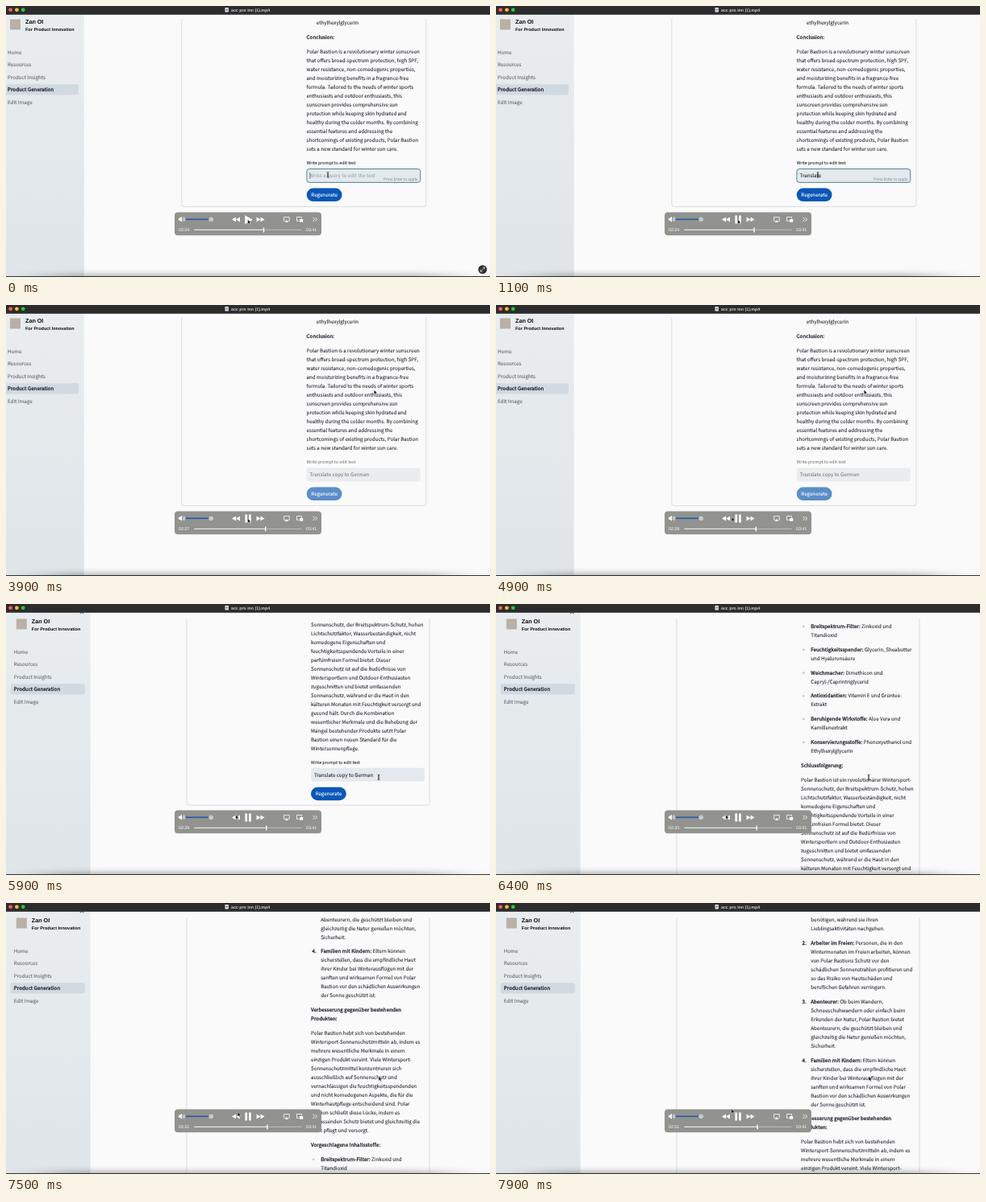
These frames come from a looping animation (600 by 337 pixels, 8 s). An HTML page:

```html
<!DOCTYPE html>
<html lang="en">
<head>
<meta charset="utf-8">
<title>Product generation demo</title>
<style>
  html, body { margin: 0; width: 100%; height: 100%; overflow: hidden; background: #fafafa; }
  svg { display: block; width: 100vw; height: 100vh; }
  text {
    font: 6.18px "Noto Sans CJK JP", "Noto Sans CJK SC", "Noto Sans", sans-serif;
    fill: #2d2f38; stroke: #2d2f38; stroke-width: .1px;
    text-rendering: geometricPrecision; white-space: pre;
  }
  /* a semibold look: slightly thickened regular letters */
  .semi { stroke-width: .34px; letter-spacing: .06px; }
  .ui { font-family: "Liberation Sans", Arial, sans-serif; font-weight: 700; stroke: none; }
  .light { stroke: none; }
  .nav { fill: #646970; stroke: #646970; }
  .nav.semi { fill: #252a33; stroke: #252a33; }
  .stale { fill: #666a72; stroke: none; }
  .empty { fill: #929aa0; stroke: none; }
</style>
</head>
<body>
<svg id="stage" viewBox="0 0 600 337" preserveAspectRatio="none"></svg>
<script>
const LOOP = 8000, STEP = 100, LINE = 11, GAP = 17.83;
const stage = document.getElementById('stage');
const $ = id => document.getElementById(id);

const ENGLISH = [
  { list: 1, lines: ['ethylhexylglycerin'] },
  { lines: ['Conclusion:|'] },
  { lines: [
    'Polar Bastion is a revolutionary winter sunscreen',
    'that offers broad-spectrum protection, high SPF,',
    'water resistance, non-comedogenic properties,',
    'and moisturizing benefits in a fragrance-free',
    'formula. Tailored to the needs of winter sports',
    'enthusiasts and outdoor enthusiasts, this',
    'sunscreen provides comprehensive sun',
    'protection while keeping skin hydrated and',
    'healthy during the colder months. By combining',
    'essential features and addressing the',
    'shortcomings of existing products, Polar Bastion',
    'sets a new standard for winter sun care.'] }
];

const bullet = (...lines) => ({ list: 1, mark: '•', lines });
const GERMAN = [
  { list: 1, lines: ['benötigen, während sie ihren', 'Lieblingsaktivitäten nachgehen.'] },
  { list: 1, mark: '2.', lines: [
    'Arbeiter im Freien:| Personen, die in den',
    'Wintermonaten im Freien arbeiten, können',
    'von Polar Bastions Schutz vor den',
    'schädlichen Sonnenstrahlen profitieren und',
    'so das Risiko von Hautschäden und',
    'beruflichen Gefahren verringern.'] },
  { list: 1, mark: '3.', lines: [
    'Abenteurer:| Ob beim Wandern,',
    'Schneeschuhwandern oder einfach beim',
    'Erkunden der Natur, Polar Bastion bietet',
    'Abenteurern, die geschützt bleiben und',
    'gleichzeitig die Natur genießen möchten,',
    'Sicherheit.'] },
  { list: 1, mark: '4.', lines: [
    'Familien mit Kindern:| Eltern können',
    'sicherstellen, dass die empfindliche Haut',
    'ihrer Kinder bei Winterausflügen mit der',
    'sanften und wirksamen Formel von Polar',
    'Bastion vor den schädlichen Auswirkungen',
    'der Sonne geschützt ist.'] },
  { lines: ['Verbesserung gegenüber bestehenden|', 'Produkten:|'] },
  { lines: [
    'Polar Bastion hebt sich von bestehenden',
    'Wintersport-Sonnenschutzmitteln ab, indem es',
    'mehrere wesentliche Merkmale in einem',
    'einzigen Produkt vereint. Viele Wintersport-',
    'Sonnenschutzmittel konzentrieren sich',
    'ausschließlich auf Sonnenschutz und',
    'vernachlässigen die feuchtigkeitsspendenden',
    'und nicht komedogenen Aspekte, die für die',
    'Winterhautpflege entscheidend sind. Polar',
    'Bastion schließt diese Lücke, indem es',
    'umfassenden Schutz bietet und gleichzeitig die',
    'Haut pflegt und versorgt.'] },
  { lines: ['Vorgeschlagene Inhaltsstoffe:|'] },
  bullet('Breitspektrum-Filter:| Zinkoxid und', 'Titandioxid'),
  bullet('Feuchtigkeitsspender:| Glycerin, Sheabutter', 'und Hyaluronsäure'),
  bullet('Weichmacher:| Dimethicon und', 'Capryl-/Caprintriglycerid'),
  bullet('Antioxidantien:| Vitamin E und Grüntee-', 'Extrakt'),
  bullet('Beruhigende Wirkstoffe:| Aloe Vera und', 'Kamillenextrakt'),
  bullet('Konservierungsstoffe:| Phenoxyethanol und', 'Ethylhexylglycerin'),
  { lines: ['Schlussfolgerung:|'] },
  { lines: [
    'Polar Bastion ist ein revolutionärer Wintersport-',
    'Sonnenschutz, der Breitspektrum-Schutz, hohen',
    'Lichtschutzfaktor, Wasserbeständigkeit, nicht',
    'komedogene Eigenschaften und',
    'feuchtigkeitsspendende Vorteile in einer',
    'parfümfreien Formel bietet. Dieser',
    'Sonnenschutz ist auf die Bedürfnisse von',
    'Wintersportlern und Outdoor-Enthusiasten',
    'zugeschnitten und bietet umfassenden',
    'Sonnenschutz, während er die Haut in den',
    'kälteren Monaten mit Feuchtigkeit versorgt und',
    'gesund hält. Durch die Kombination',
    'wesentlicher Merkmale und die Behebung der',
    'Mängel bestehender Produkte setzt Polar',
    'Bastion einen neuen Standard für die',
    'Wintersonnenpflege.'] }
];

const text = (x, y, s, attrs = '') => `<text x="${x}" y="${y}" ${attrs}>${s}</text>`;
const rect = (x, y, w, h, fill, attrs = '') =>
  `<rect x="${x}" y="${y}" width="${w}" height="${h}" fill="${fill}" ${attrs}/>`;
const path = (d, attrs) => `<path d="${d}" ${attrs}/>`;

// Lays blocks out upwards so that the last baseline is at `bottom`.
function flow(blocks, x, bottom) {
  let y = bottom, out = '';
  for (const { list, mark, lines } of [...blocks].reverse()) {
    const left = x + (list ? 12.2 : 0);
    const top = y - (lines.length - 1) * LINE;
    lines.forEach((line, i) => {
      const cut = line.indexOf('|');
      const body = cut < 0 ? line
        : `<tspan class="semi">${line.slice(0, cut)}</tspan>${line.slice(cut + 1)}`;
      out += text(left, top + i * LINE, body);
    });
    if (mark === '•') out += `<circle cx="${x + 3.3}" cy="${top - 2}" r="1.1" fill="#d4d5d8" stroke="#b4b6ba" stroke-width=".5"/>`;
    else if (mark) out += text(x + 1.4, top, mark, 'class="semi"');
    y = top - GAP;
  }
  return out;
}

function sidebar() {
  const items = ['Home', 'Resources', 'Product Insights', 'Product Generation', 'Edit Image'];
  return `<g id="sidebar">${rect(-12, 0, 108.8, 340, 'url(#side)')}
    ${rect(-2, 97.2, 92, 13.4, '#d2dae1', 'rx="2"')}
    ${rect(5, 16.5, 13, 13, '#b9b0a6')}
    ${text(24, 21.8, 'Zan OI', 'class="ui" style="font-size:7.2px;fill:#0b0b0b"')}
    ${text(24, 30.5, 'For Product Innovation', 'class="ui" style="font-size:5.5px;fill:#0b0b0b"')}
    ${items.map((s, i) => text(2, 59.6 + i * 15.55, s, `class="nav${i === 3 ? ' semi' : ''}"`)).join('')}
    </g>`;
}

const form = `<g id="form">
  <text id="label" x="372.7" y="197.4" style="font-size:5.34px">Write prompt to edit text</text>
  <rect id="field" x="372.9" y="202.6" width="140.8" height="16.8" rx="3" stroke-width=".9"/>
  <text id="query" x="376.6" y="213.4"></text>
  <path id="caret" d="M376.9 207.5v7.2" stroke="#333" stroke-width=".6"/>
  <text id="hint" class="light" x="468" y="217.2" style="font-size:4.57px;fill:#757d83">Press Enter to apply</text>
  <rect id="button" x="372.7" y="226.5" width="43.8" height="16.6" rx="8.3"/>
  ${text(394.6, 237.3, 'Regenerate', 'text-anchor="middle" style="fill:#fff;stroke:#fff"')}
</g>`;

const card = (x, w, bottom) =>
  rect(x, -900, w, bottom + 900, 'none', 'rx="3" stroke="#d9dade" stroke-width=".9"');

const white = 'fill="#fff"', thin = 'fill="none" stroke="#fff" stroke-width=".8"';
const clockStyle = 'class="ui" style="font-size:5.3px;font-weight:400;fill:#fff"';
const player = `${rect(209, 256.5, 182, 28.8, '#92928f', 'rx="4"')}
  ${path('M214 263.8h1.8l2.2-2v7l-2.2-2h-1.8z', white)}
  ${path('M219.3 263.6q1.3 1.7 0 3.4M220.6 262.4q2.2 2.9 0 5.8', thin)}
  ${path('M223 265.3h31', 'stroke="#2459a8" stroke-width="1.6"')}
  <circle cx="254.2" cy="265.3" r="2.9" fill="#c9c9c9"/>
  ${path('M285 262.4v6l-5-3zM290 262.4v6l-5-3zM310.6 262.4v6l5-3zM315.6 262.4v6l5-3z', white)}
  ${path('M296.2 260.3v11l9.6-5.5z', white + ' id="play"')}
  ${path('M296.4 260.6h2.7v10h-2.7zM301.1 260.6h2.7v10h-2.7z', white + ' id="pause"')}
  ${path('M346 267.3h-1.4v-4.7h6.6v4.7h-1.4', thin)}${path('M347.9 266l2.2 3h-4.4z', white)}
  ${path('M363.5 267.3h-3v-4.8h6v2', thin)}${rect(364, 265, 4.2, 3.8, '#fff', 'rx=".5"')}
  ${path('M380.3 262.8l2.4 2.6-2.4 2.6M383.3 262.8l2.4 2.6-2.4 2.6', thin)}
  <text id="clock" x="214" y="280.2" ${clockStyle}></text>
  ${text(372, 280.2, '03:41', clockStyle)}
  ${path('M233.5 278.4h133', 'stroke="#bdbdbd" stroke-width="1"')}
  <path id="played" stroke="#f2f2f2" stroke-width="1"/>
  <rect id="knob" y="275.4" width="1.4" height="6" rx=".5" fill="#fff"/>`;

const titleBar = `${rect(0, 0, 600, 10.8, '#2c2c2d')}
  ${['#ff5f57', '#febc2e', '#28c840'].map((c, i) => `<circle cx="${5.6 + i * 7.8}" cy="4.8" r="2.4" fill="${c}"/>`).join('')}
  ${rect(271.5, 2, 4.4, 5.6, '#e4e6ea', 'rx=".6"')}${rect(272.5, 3.6, 2.4, 2, '#7d8894')}
  ${text(279, 6.6, 'acc pro inn (1).mp4', 'class="ui" style="font-size:5.25px;fill:#d2d2d2"')}`;

const arrowShape = 'd="M0 0v5.7l1.4-1.2 1 2.1 1-.4-1-2.1h1.8z" fill="#111" stroke="#fff" stroke-width=".45"';

stage.innerHTML = `<defs>
    <linearGradient id="side" x2="0" y2="1"><stop stop-color="#e9edf0"/><stop offset="1" stop-color="#dfe5e9"/></linearGradient>
    <filter id="soft" x="-30%" y="-300%" width="160%" height="700%"><feGaussianBlur stdDeviation="30 4.5"/></filter>
    <clipPath id="page"><rect id="pageTop" x="97" width="503" height="330"/></clipPath>
  </defs>
  ${rect(0, 0, 600, 337, '#fafafa')}
  <g clip-path="url(#page)"><g id="scroll">
    <g id="english">${card(217.8, 303, 249.6)}${flow(ENGLISH, 372.6, 179.9)}</g>
    <g id="german">${card(224, 301, 250.2)}${flow(GERMAN, 378, 181.9)}</g>
    ${form}
  </g></g>
  ${sidebar()}
  ${path('M92 12.2l2-2 2 2', 'id="close" fill="none" stroke="#222" stroke-width=".9"')}
  ${rect(50, 335, 500, 16, '#000', 'opacity=".4" filter="url(#soft)"')}
  ${rect(0, 336.1, 600, .9, '#1c1c1c')}
  <g id="badge"><circle cx="590.8" cy="327.6" r="5.4" fill="#303030"/>
    ${path('M588.4 330l4.8-4.8M591 325h2.3v2.3M590.6 330.2h-2.3v-2.3', 'fill="none" stroke="#ddd" stroke-width=".8"')}</g>
  ${titleBar}
  <path id="beam" d="M-1.4-3.3q1.4 0 1.4.8v5q0 .8-1.4.8M1.4-3.3q-1.4 0-1.4.8v5q0 .8 1.4.8" fill="none" stroke="#222" stroke-width=".7"/>
  <path id="arrow" ${arrowShape}/>
  ${player}
  <path id="pointer" ${arrowShape}/>`;

const linear = p => p, smooth = p => p * p * (3 - 2 * p);

// Interpolates [time, value, ...] stops.
function track(t, stops, ease = smooth) {
  const i = stops.findIndex(s => s[0] > t);
  if (i === 0) return stops[0].slice(1);
  if (i < 0) return stops[stops.length - 1].slice(1);
  const a = stops[i - 1], b = stops[i], p = ease((t - a[0]) / (b[0] - a[0]));
  return a.slice(1).map((v, k) => v + (b[k + 1] - v) * p);
}

const show = (id, on) => $(id).setAttribute('display', on ? 'inline' : 'none');
const move = (id, [x, y]) => $(id).setAttribute('transform', `translate(${x} ${y})`);
const set = (id, attrs) => { for (const k in attrs) $(id).setAttribute(k, attrs[k]); };

const PROMPT = 'Translate copy to German';
const MOUSE = [[2500, 399, 210], [3300, 456.2, 105.5], [5000, 456.2, 105.5], [5500, 462, 215.5]];
const POINTER = [[4600, 299.6, 265.4], [5200, 284.6, 262], [7300, 284.6, 262], [7800, 291.8, 256]];
const SCROLL = [[6000, 0], [6400, 203.8], [7100, 359.5], [7900, 629.8]];

function draw(t) {
  const translated = t >= 5000, stale = t >= 2700 && !translated;
  const focused = t < 2700, playing = t >= 300;

  show('english', !translated);
  show('german', translated);
  show('close', translated);
  move('sidebar', translated ? [7.8, 2] : [0, 0]);
  move('form', translated ? [5.3, 1.2] : [0, 0]);
  move('scroll', [0, track(t, SCROLL, linear)[0]]);
  set('pageTop', { y: translated ? 18.3 : 16 });

  const typed = Math.max(0, Math.min(PROMPT.length, Math.round((t - 500) / 1500 * PROMPT.length)));
  $('query').textContent = typed ? PROMPT.slice(0, typed) : 'Write a query to edit the text';
  set('query', { class: !typed ? 'empty' : stale ? 'stale' : '' });
  set('label', { class: stale ? 'stale' : '' });
  set('field', { fill: stale ? '#eaecee' : '#e3e9ed', stroke: focused ? '#3f7a8c' : 'none' });
  set('button', { fill: stale ? '#5a8ec9' : '#0a57b8' });
  show('caret', !typed);
  show('hint', focused);

  const beam = t < 2600 || (t >= 5500 && t < 6700);
  const mouse = track(t, MOUSE);
  show('beam', beam);
  show('arrow', !beam);
  move('beam', mouse);
  move('arrow', mouse);

  show('badge', t < 200);
  show('play', !playing);
  show('pause', playing);
  const seconds = Math.max(144.05, 143.75 + t / 1000), x = 233.5 + 132 * seconds / 221;
  const pad = n => String(Math.floor(n)).padStart(2, '0');
  $('clock').textContent = `${pad(seconds / 60)}:${pad(seconds % 60)}`;
  set('played', { d: `M233.5 278.4H${x}` });
  set('knob', { x: x - .7 });
  move('pointer', track(t, POINTER));
}

const start = performance.now();
function tick() {
  const t = (performance.now() - start) % LOOP;
  draw(Math.floor(t / STEP) * STEP);
  requestAnimationFrame(tick);
}
tick();
</script>
</body>
</html>
```
